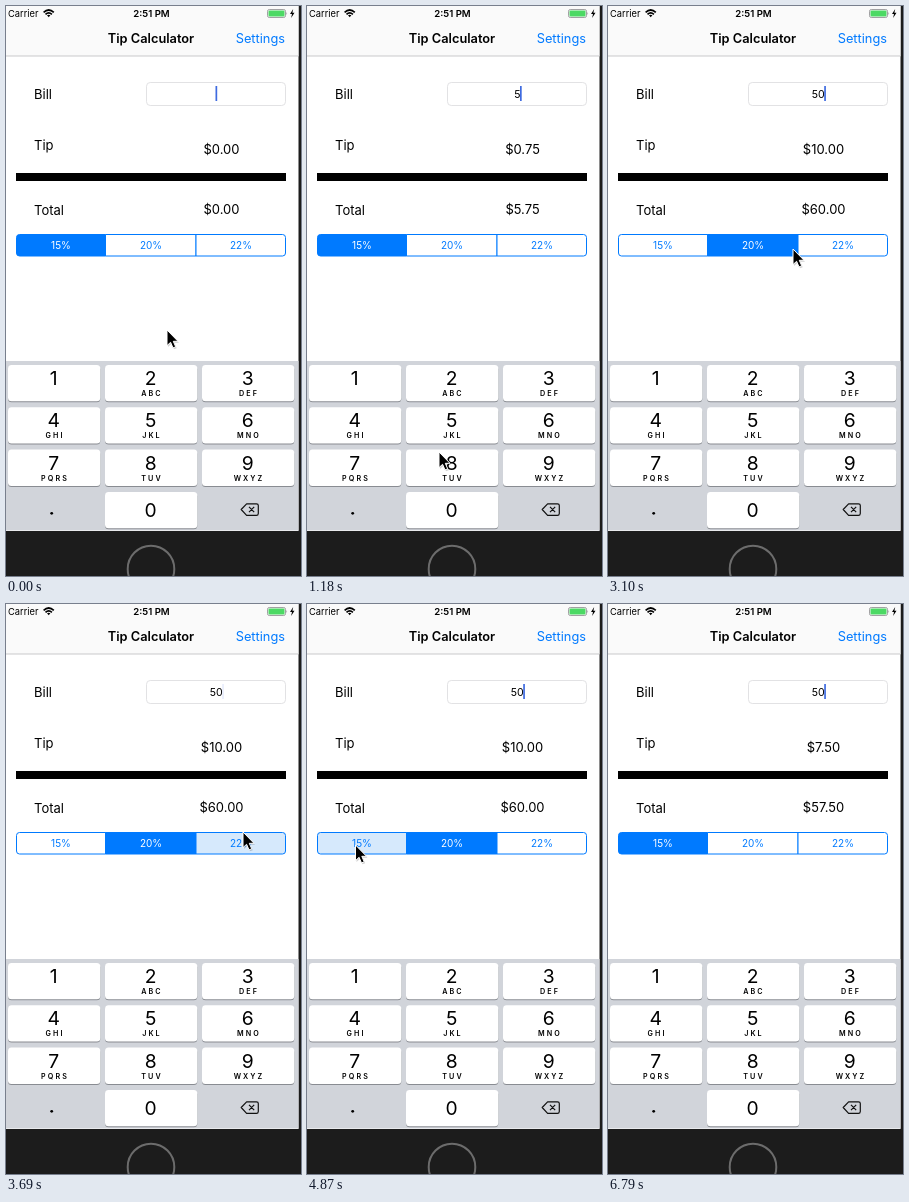
Recreate the animation shown at these times as an HTML page. Size 295 px wide and 570 px high, loop 6.89 s.

```html
<!DOCTYPE html>
<html lang="en">
<head>
<meta charset="utf-8">
<title>Tip calculator</title>
<style>
  html, body { margin: 0; width: 100%; height: 100%; overflow: hidden; background: #fff; }
  svg { display: block; width: 295px; height: 570px; font-family: Inter, "Liberation Sans", sans-serif; }
  .mid { text-anchor: middle; }
  .bold { font-weight: 600; }
</style>
</head>
<body>
<svg id="stage" viewBox="0 0 295 570" xmlns="http://www.w3.org/2000/svg">
  <rect width="295" height="570" fill="#1c1c1c"/>
  <rect width="292.5" height="525" fill="#fff"/>
  <rect width="292.5" height="50" fill="#fafafa"/>
  <rect y="49.5" width="292.5" height="1" fill="#c9c9cb"/>

  <g id="status">
    <text x="2" y="11" font-size="9.3">Carrier</text>
    <g fill="none" stroke="#000" stroke-width="1.7">
      <path d="M37.6 6.3Q42.7 1.7 47.8 6.3M39.5 8.4Q42.7 5.5 45.9 8.4"/>
      <path d="M41 9.3Q42.7 8 44.4 9.3L42.7 11.2Z" fill="#000" stroke="none"/>
    </g>
    <text class="mid bold" x="145.5" y="11" font-size="9.6">2:51 PM</text>
    <rect x="261.5" y="3.5" width="18" height="8" rx="1.8" fill="none" stroke="#8b8b8d" stroke-width=".8"/>
    <rect x="262.5" y="4.5" width="16" height="6" rx="1" fill="#4cd964"/>
    <path d="M280.5 6v3q1.3-1.5 0-3" fill="#8b8b8d"/>
    <path d="M287.2 3L284 8h2l-.9 4 3.4-5.2h-2.1Z"/>
  </g>

  <text class="mid bold" x="145" y="37" font-size="12.8">Tip Calculator</text>
  <text x="229.7" y="37" font-size="12.8" fill="#007aff">Settings</text>

  <g font-size="13">
    <text x="28" y="93">Bill</text>
    <text x="28" y="143.5">Tip</text>
    <text x="28" y="208.5">Total</text>
    <text id="tip" class="mid" x="215.5" y="147.5"></text>
    <text id="total" class="mid" x="215.5" y="207.5"></text>
  </g>
  <rect x="140.5" y="76.5" width="139" height="23" rx="3.8" fill="#fff" stroke="#e2e2e4"/>
  <text id="bill" class="mid" x="210.3" y="91.5" font-size="10.6"></text>
  <rect id="caret" y="80" width="1.7" height="15" fill="#3f6be0"/>
  <rect x="10" y="167" width="270" height="8"/>

  <g id="segments"></g>
  <g id="keyboard"><rect y="355" width="292.5" height="169.5" fill="#d1d4da"/></g>
  <circle cx="145" cy="563" r="23.3" fill="none" stroke="#6c6c6c" stroke-width="2"/>

  <g id="cursor">
    <path d="M1 1.5V17l3.6-3.2L7 19.3l2.7-1.1-2.4-5.4H12Z" fill="#000" opacity=".18"/>
    <path d="M0 0V15.6L3.6 12.3 6 17.9 8.7 16.8 6.3 11.3H11Z" stroke="#fff" stroke-width="1" stroke-linejoin="round"/>
  </g>
</svg>
<script>
const LOOP = 6890, STEP = 147.5, BLUE = '#007aff';
const RATES = [15, 20, 22];
const $ = id => document.getElementById(id);

function add(parent, tag, attrs, text) {
  const el = document.createElementNS('http://www.w3.org/2000/svg', tag);
  for (const name in attrs) el.setAttribute(name, attrs[name]);
  if (text) el.textContent = text;
  return parent.appendChild(el);
}

// Segmented control
const edges = [10.5, 99.5, 190, 279.5];
const segments = RATES.map((rate, i) => {
  const left = edges[i], right = edges[i + 1], r = 3;
  const d = i === 0 ? `M${right} 228.5H${left + r}q-${r} 0-${r} ${r}V247q0 ${r} ${r} ${r}H${right}Z`
    : i === 2 ? `M${left} 228.5H${right - r}q${r} 0 ${r} ${r}V247q0 ${r}-${r} ${r}H${left}Z`
    : `M${left} 228.5H${right}V250H${left}Z`;
  return {
    box: add($('segments'), 'path', { d, stroke: BLUE }),
    label: add($('segments'), 'text', { class: 'mid', x: 55 + 90 * i, y: 243, 'font-size': 10 }, rate + '%')
  };
});

// Number pad
const letters = ['', 'ABC', 'DEF', 'GHI', 'JKL', 'MNO', 'PQRS', 'TUV', 'WXYZ'];
const keys = {};
function addKey(digit, col, row, sub) {
  const x = 2 + 97 * col, y = 359 + 42.3 * row, pad = $('keyboard');
  const box = { x, y, width: 92.3, height: 36.3, rx: 3.5 };
  add(pad, 'rect', { ...box, y: y + 1, fill: '#898c92' });
  keys[digit] = add(pad, 'rect', box);
  add(pad, 'text', { class: 'mid', x: x + 45.7, y: y + (row < 3 ? 20 : 25), 'font-size': 19.3 }, String(digit));
  if (sub) add(pad, 'text', {
    class: 'mid bold', x: x + 47, y: y + 31, 'font-size': 7.2, 'letter-spacing': 2.1
  }, sub);
}
letters.forEach((sub, i) => addKey(i + 1, i % 3, Math.floor(i / 3), sub));
addKey(0, 1, 3);
add($('keyboard'), 'circle', { cx: 45.7, cy: 507.3, r: 1.4 });
add($('keyboard'), 'path', {
  d: 'M235.2 503.5L240.6 497.8H250.5Q252.3 497.8 252.3 499.6V507.6Q252.3 509.4 250.5 509.4H240.6ZM243 500.9l5.2 5.2m0-5.2l-5.2 5.2',
  fill: 'none', stroke: '#111', 'stroke-width': 1.2, 'stroke-linejoin': 'round'
});

// Pointer path: step, x, y
const path = [
  [0, 161, 324], [3, 146, 480], [5, 142, 417], [6, 142, 416], [8, 132, 446],
  [10, 129, 490], [11, 129, 496], [12, 132, 482], [14, 169, 263], [16, 157, 244],
  [17, 150, 239], [18, 150, 239], [21, 185, 243], [24, 237, 228], [26, 237, 228],
  [28, 192, 250], [30, 139, 235], [31, 136, 236], [32, 48.5, 241], [34, 48.5, 241]
];
const presses = { 5: 5, 11: 0 };
const touches = { 17: 1, 25: 2, 30: 1, 33: 0 };
const choices = [[0, 0], [18, 1], [26, 2], [31, 1], [34, 0]];

function pointerAt(step) {
  const i = Math.max(1, path.findIndex(p => p[0] >= step));
  const [a, b] = [path[i - 1], path[i]];
  const k = (step - a[0]) / (b[0] - a[0]);
  return [a[1] + (b[1] - a[1]) * k, a[2] + (b[2] - a[2]) * k];
}

// One-second blink, restarted by each typed digit
function caretOpacity(t) {
  const start = t < 880 ? -100 : t < 1680 ? 840 : 1680;
  const phase = (t - start) % 1000;
  return Math.max(0, Math.min(1, phase / 60, (650 - phase) / 160));
}

function render(t) {
  const step = Math.min(46, Math.floor((t + 5) / STEP));
  const bill = step < 6 ? '' : step < 12 ? '5' : '50';
  const chosen = choices.filter(c => c[0] <= step).pop()[1];
  const tip = bill * RATES[chosen] / 100;

  $('bill').textContent = bill;
  $('tip').textContent = '$' + tip.toFixed(2);
  $('total').textContent = '$' + (+bill + tip).toFixed(2);
  $('caret').setAttribute('x', [209.5, 213, 216.2][bill.length]);
  $('caret').setAttribute('opacity', caretOpacity(step * STEP));

  segments.forEach(({ box, label }, i) => {
    box.setAttribute('fill', i === chosen ? BLUE : touches[step] === i ? '#d6e9fc' : '#fff');
    label.setAttribute('fill', i === chosen ? '#fff' : BLUE);
  });
  for (const digit in keys) keys[digit].setAttribute('fill', presses[step] === +digit ? '#b7bcc6' : '#fff');

  const shown = step <= 34;
  $('cursor').setAttribute('visibility', shown ? 'visible' : 'hidden');
  if (shown) $('cursor').setAttribute('transform', `translate(${pointerAt(step)})`);
}

const begin = performance.now();
function tick() {
  render((performance.now() - begin) % LOOP);
  requestAnimationFrame(tick);
}
tick();
</script>
</body>
</html>
```
